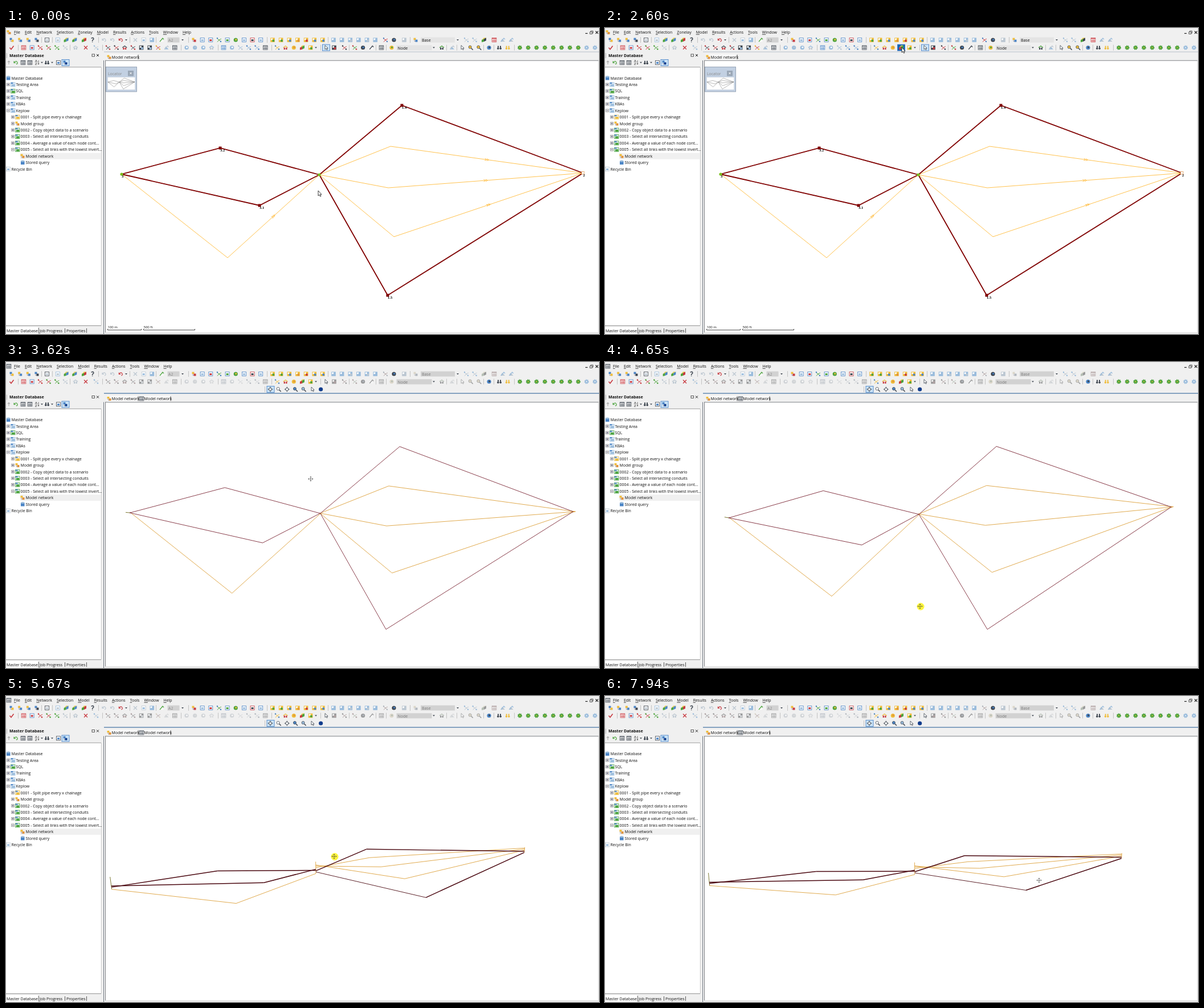
An HTML page that plays this animation: 1041x538 px, repeating every 8000 ms.

```html
<!DOCTYPE html>
<html lang="en">
<head>
<meta charset="utf-8">
<title>Network 3D view</title>
<style>
html, body { margin: 0; width: 100%; height: 100%; overflow: hidden; background: #f0f0f0; }
svg { display: block; width: 1041px; height: 538px; }
text { font: 6.95px "Open Sans", "Noto Sans", sans-serif; fill: #111; white-space: pre; }
.bold { font-size: 7.15px; font-weight: 700; }
.node { font: 700 6.5px "Liberation Serif", serif; fill: #000; }
.small { font-size: 6px; }
.grey { fill: #8a8a8a; }
.solid .off { filter: grayscale(.8) opacity(.5); }
.combo rect { fill: #e4e4e4; }
.solid .combo rect { fill: #d2d2d2; }
.solid .combo text { fill: #777; }
#view path { fill: none; }
</style>
</head>
<body>
<svg id="stage" viewBox="0 0 1041 538"></svg>
<script>
const stage = document.getElementById('stage');
const $ = id => document.getElementById(id);
const OPEN_TAB = 2700, OPEN_VIEW = 3220, SHIFT_AT = 3480, LOOP = 8000;
const SHIFT = 13.5, PITCH = 14.65, ROW = 11.43;

// ---------- drawing helpers ----------
const rect = (x, y, w, h, fill, stroke = 'none') =>
  `<rect x="${x}" y="${y}" width="${w}" height="${h}" fill="${fill}" stroke="${stroke}" stroke-width=".8"/>`;
const disc = (x, y, r, fill, stroke = 'none') =>
  `<circle cx="${x}" cy="${y}" r="${r}" fill="${fill}" stroke="${stroke}" stroke-width=".8"/>`;
const path = (d, stroke, w = 1, fill = 'none') =>
  `<path d="${d}" stroke="${stroke}" stroke-width="${w}" fill="${fill}"/>`;
const text = (x, y, s, cls = '') => `<text x="${x}" y="${y}" class="${cls}">${s}</text>`;
const group = (id, body) => `<g id="${id}">${body}</g>`;
const button = (x, y) => rect(x - 6.5, y - 5.5, 13, 11, '#cce4f7', '#3a78c2');

// ---------- toolbar icons ----------
const INK = {
  b: '#4a84c6', l: '#9abcdc', y: '#efbd3c', r: '#c83a40', g: '#4ba33c',
  k: '#3c444e', p: '#bcc7d1', w: '#ffffff', n: '#103c8c', o: '#e0923a'
};
const ICON = {
  t: (a, b) => rect(-3.5, -3.5, 4, 3.5, a) + rect(-.5, -.5, 4, 4, b) + path('M-2 0V2.5H0', '#889', .7),
  s: (a, b) => rect(-3.5, -3.5, 7, 7, '#fff', a) + rect(-2, -1, 4, 3, b),
  f: (a, b) => rect(-3.5, -3.5, 7.5, 7, '#e3edf6', a) + rect(-3.5, -3.5, 4, 2, b) + rect(-2, -.5, 5.5, 3.5, a),
  m: (a, b) => rect(-3.8, -3.8, 7.6, 7.6, a) + rect(-2.8, -2.8, 3, 3, '#fff') + rect(-.5, -.5, 3.6, 3.6, b),
  d: (a, b) => disc(0, 0, 3.6, a) + disc(.5, -.5, 1.6, b),
  b: (a, b) => rect(-3, -2.5, 6.5, 6, a) + `<ellipse cx=".2" cy="-2.5" rx="3.2" ry="1.5" fill="${b}"/>`,
  x: a => path('M-3-3L3 3M3-3L-3 3', a, 1.3),
  n: (a, b) => path('M-4-3L0 0L4-2M0 0L-3 3.5M0 0L3.5 3.5', a, .9) + disc(-3, -3, 1.2, b) + disc(3, 2.8, 1.2, b),
  g: a => rect(-3.8, -3.5, 7.6, 7, '#fff', a) + path('M-4-2.5H4M-3.5 1H3.5M-1-2V3.5M1.5-2V3.5', a, .8),
  c: a => path('M-3.5 0L-1 3L3.5-3', a, 1.6),
  u: a => path('M-3-2.5V.5H0M-3 .5Q1-5 3 0Q3.5 2 1 3', a, 1.1),
  i: (a, b) => path('M-4 0L0-3L4 0', a, 1.2) + rect(-3, 0, 2.4, 3.4, b) + rect(.5, 0, 2.4, 3.4, b),
  k: a => path('M-2-3V0M2-3V0', a, 2) + disc(-2.2, 1.5, 1.8, a) + disc(2.2, 1.5, 1.8, a),
  z: (a, b) => path('M1 1L4 4', a, 1.5) + disc(-1, -1, 2.5, b, a),
  h: (a, b) => `<circle r="3" fill="${a}" stroke="${a}" stroke-width="2" stroke-dasharray="1.5 1"/>` + disc(0, 0, 1, b),
  q: a => path('M-2-3Q3-5 2-1L0 .5V2M0 3V4', a, 1.5),
  e: (a, b) => path('M-4 3L-1-2L4 3Z', 'none', 0, b) + path('M-3 3L2-3L4-1', a, 1.2),
  a: (a, b) => path('M-2-4V3L0 1.5L1.2 4L2.3 3.4L1.2 1H3.2Z', a, .8, b),
  o: (a, b) => disc(0, 0, 2.7, b, a) + path('M0-4.5V-1.5M0 1.5V4.5M-4.5 0H-1.5M1.5 0H4.5', a, .9),
  j: (a, b) => path('M-4 0L0-2V3L-4 4Z', 'none', 0, a) + path('M0-2L4-4V1L0 3Z', 'none', 0, b) +
    path('M-4 0L0-4L4-4L0-2Z', 'none', 0, '#e9cf4e'),
  v: a => path('M-2-1H2L0 1.3Z', 'none', 0, a)
};

// A number starts a run of evenly spaced icons; "|" puts a separator before it, "*" greys it in the solid view
function icons(spec, y) {
  let x = 0, off = '', out = '';
  for (const token of spec.trim().split(/\s+/)) {
    const run = token.match(/^(\|?)(\*?)([\d.]+)$/);
    if (run) {
      x = +run[3];
      off = run[2] && 'off';
      if (run[1]) out += path(`M${x - 9.5} ${y - 5}v10`, '#b8b8b8', .8);
      continue;
    }
    const [kind, a, b] = token;
    out += `<g transform="translate(${x} ${y})" class="${off}">${ICON[kind](INK[a], INK[b])}</g>`;
    x += PITCH;
  }
  return out;
}
const ROW1 = `10 tby tyb tyb tbk |72 skp |91 slp jgb jgb 137 jgr qk |172 up up urg 211 vk
  |227 xp spl mll |273 egw 310 vk |330 tyr sbl sbr ngb sbg dgy sbl srk sbl
  |468 myg myg myb myo myr myb myb |575 mll mll mlp mll mlp mll *666 nrb 681 dkb 699 mpp
  |*719 tyb 793 vk 808 npl npl *839 jgk *857 gr 872 elp elp`;
const ROW2 = `10 cr |31 gr sbr 60 nrr nrg ngg npp |122 ipp 140 xr 158 npl
  |*179 nkr nrk ikr nkr mkl mkl nry epl gk |*317 dlw dlp dlw ilp |*382 gb dlw nlp nlb nlb gk
  |476 nyb iyr dyo jrg myg 544 vk |562 akw *576 mkr *594 nrk |*612 ngr dkb ekw |*659 gk
  |*677 dyg 751 vk *765 igk |*783 epl |*801 akw zky zky |848 dbk |866 kk ky
  |902 ${'hgy '.repeat(8)} hlw hlw`;
const ROW3 = '|464 okw zkw okw zkb zkl 538 akw dnn';

// ---------- menus ----------
const menu = names => '<text x="14" y="10.3">' + names.map((s, i) =>
  `<tspan dx="${i && 8}" text-decoration="underline">${s[0]}</tspan>${s.slice(1)}`).join('') + '</text>';
const first = ['File', 'Edit', 'Network', 'Selection'];
const rest = ['Model', 'Results', 'Actions', 'Tools', 'Window', 'Help'];
const windowBtns = path('M1017 9.5H1021', '#222', 1.2) + rect(1025, 7, 4, 3.5, 'none', '#333') +
  path('M1026.5 7V5.2H1030.5V9H1029', '#333', .8) + path('M1035 5.5L1039.5 10M1039.5 5.5L1035 10', '#222', 1.1);

// ---------- database tree: depth, toggle, icon, label ----------
const TREE = [
  [0, '', 'bbl', 'Master Database'], [0, '+', 'flb', 'Testing Area'], [0, '+', 'fgb', 'SQL'],
  [0, '+', 'flb', 'Training'], [0, '+', 'flb', 'KBAs'], [0, '-', 'flb', 'Keplow'],
  [1, '+', 'fyb', '0001 - Split pipe every x chainage'], [1, '+', 'tyo', 'Model group'],
  [1, '+', 'fgb', '0002 - Copy object data to a scenario'],
  [1, '+', 'fgb', '0003 - Select all intersecting conduits'],
  [1, '+', 'fgb', '0004 - Average a value of each node cont...'],
  [1, '-', 'fgb', '0005 - Select all links with the lowest invert...'],
  [2, '', 'tyo', 'Model network'], [2, '', 'bbl', 'Stored query'], [0, '', 'spl', 'Recycle Bin']
];
const tree = TREE.map(([depth, toggle, icon, label], i) => {
  const y = 88 + i * ROW, x = 4 + depth * 8;
  const ix = toggle ? x + 8 : depth ? 29 : 4;
  const box = toggle && rect(x - 2.3, y - 2.3, 4.6, 4.6, '#fff', '#888') +
    path(`M${x - 1.4} ${y}h2.8` + (toggle === '+' ? `M${x} ${y - 1.4}v2.8` : ''), '#224', .8);
  return (i === 12 ? rect(25, y - 5.5, 142, 11, '#f0f0f0') : '') + box +
    icons(`${ix} ${icon}`, y) + text(ix + 5.5, y + 2.6, label);
}).join('');

const panel = rect(0, 41, 168, 28, '#f0f0f0') + text(6, 50.8, 'Master Database', 'bold') +
  path('M1.5 44V53', '#bbb') + rect(151, 46, 4.5, 4, 'none', '#333') +
  path('M159 46L163 50M163 46L159 50', '#222') + path('M5 64V58M3 60L5 58L7 60', '#aaa', 1.1) +
  button(104.5, 61) + icons('17 ug 30 gk 42 gk 63 vk 72 kk 81 vk 92 skb 104 tbn', 60.8) +
  text(51, 60, 'A', 'small') + text(51, 65, 'Z', 'small') + path('M57 57V64M56 62.5L57 64L58 62.5', '#333', .7) +
  path('M0 68.8H167', '#8a8a8a', .8);

const tab = (x, icon) => rect(x, 45.5, 55, 11.5, '#f8f8f8') + icons(`${x + 4} ${icon}`, 51) +
  text(x + 8.5, 53.8, 'Model network') + path(`M${x + 55} 47V55`, '#333', .9);
const strip = rect(168, 41, 873, 16, '#f0f0f0') + path('M172 42H1041', '#a8b4c0', .8) +
  tab(177, 'tyo') + group('tab2', tab(234, 'gk')) + path('M174 57.2H1040', '#7d8084');
const combo = (x, y, w, s) => `<g class="combo">${rect(x, y - 4.5, w, 9, '')}${text(x + 2, y + 2.7, s)}</g>`;

// ---------- network ----------
const PLAN = {
  L: [203, 257], A: [376, 211], B: [445, 312], C: [389, 404], M: [550, 258], T: [695, 136],
  E: [675, 208], F: [671, 281], G: [681, 367], D: [670, 470], R: [1013, 255]
};
const DARK = ['LAM', 'LBM', 'MTR', 'MDR'], PALE = ['LCM', 'MER', 'MFR', 'MGR'];
const LABELS = { L: '3', A: '3.2', B: '3.1', T: '1.4', D: '1.5', R: '2' };
const routes = list => list.map(s => 'M' + [...s].map(k => PLAN[k].join(' ')).join('L')).join('');
const chevrons = ['CM', 'ER', 'FR', 'GR'].map(([p, q]) => {
  const [[ax, ay], [bx, by]] = [PLAN[p], PLAN[q]];
  const turn = Math.atan2(by - ay, bx - ax) * 180 / Math.PI;
  return `<g transform="translate(${(ax + bx) / 2} ${(ay + by) / 2}) rotate(${turn})">` +
    path('M-3.5-2L0 0L-3.5 2M0-2L3.5 0L0 2', '#ffbf4a', .9) + '</g>';
}).join('');
const nodes = [...'ABTD'].map(k => rect(PLAN[k][0] - 2.5, PLAN[k][1] - 2.5, 5, 5, '#800000')).join('') +
  [...'LM'].map(k => disc(...PLAN[k], 2.6, '#7ac01e')).join('') + rect(1010.5, 252.5, 4.5, 4.5, '#fff', '#e0a060') +
  Object.entries(LABELS).map(([k, s]) => text(PLAN[k][0], PLAN[k][1] + 6.3, s, 'node')).join('');
const locator = rect(175.5, 68.5, 54, 43.5, '#c2d0e2', '#8796aa') + text(179, 82.5, 'Locator', 'grey') +
  rect(214, 75, 10, 9.5, '#9aa7b6') + path('M217.5 78L220.5 81.2M220.5 78L217.5 81.2', '#fff') +
  rect(178.5, 86.5, 48, 22, '#fff', '#d4dbe4') +
  `<g transform="translate(167.1 80.1) scale(.058)">${path(routes([...DARK, ...PALE]), '#777', 9)}</g>`;
const map = path(routes(PALE), '#ffc24f') + chevrons + path(routes(DARK), '#800000', 1.8) + nodes + locator +
  text(178.5, 528, '100 m', 'small') + text(241.5, 528, '500 ft', 'small') +
  path('M178.5 529V531H237.5V529M241.5 529V531H331.5V529', '#333', .9);

// ---------- cursors ----------
const cursors =
  group('arrow', path('M0 0V9L2 7.2L3.5 10.2L5 9.5L3.6 6.6H6Z', '#111', .8, '#fff')) +
  group('upArrow', path('M0 .5L7 7.5H3.8V12.5H-3.8V7.5H-7Z', '#111', 1.2, '#fff')) +
  group('orbit', group('halo', disc(1, .5, 6.5, '#fdf53e')) +
    path('M0-4.2L-1.6-2.5H1.6ZM0 4.2L-1.6 2.5H1.6ZM-4.4 0L-2.6-1.6V1.6ZM4.4 0L2.6-1.6V1.6Z', 'none', 0, '#333') +
    disc(0, 0, 1.1, '#333'));

stage.innerHTML =
  rect(0, 0, 1041, 538, '#f0f0f0') + rect(0, 60, 167, 463, '#fff') + rect(174.5, 57, 865.5, 478.5, '#fff') +
  path('M174.5 57V535.5', '#7d8084') + path('M171.5 55V538', '#6f7780') + path('M167.3 55V523', '#bbb', .7) +
  path('M1040 57V535.5H174.5', '#d8d8d8', .8) + path('M0 523.3H167', '#777', .8) +
  rect(0, 526, 57, 12, '#fff') + text(1, 534.8, 'Master Database') + text(59, 534.8, 'Job Progress') +
  text(106, 534.8, 'Properties') + path('M57.3 527V537M103.5 528V536M141.5 528V536', '#333', .8) +
  group('map', map) + group('view', '') + group('low', tree + panel + strip) +
  group('row3', rect(168, 41, 873, 13.5, '#f0f0f0') + path('M172 55H1041', '#3a6ea5') +
    button(464.5, 48) + icons(ROW3, 48)) +
  group('bars', rect(283.5, 16.5, 21, 9, '#d2d2d2') + text(285, 23.8, 'A2', 'grey') +
    combo(728, 21, 60, 'Base') + combo(685.5, 34.8, 62, 'Node') +
    group('hot', button(520, 34.5)) + group('pick', button(562, 34.5)) +
    icons(ROW1, 21) + icons(ROW2, 34.5)) +
  group('menuA', icons('5 tyo', 7.5) + menu([...first, 'Zonelay', ...rest])) +
  group('menuB', icons('5 gk', 7.5) + menu([...first, ...rest])) + windowBtns + cursors;

// ---------- motion: [time, values...] ----------
const CAMERA = [[4040, 0, 0], [4650, .022, .04], [4760, .022, .04], [4980, .18, .85],
  [5300, .19, .9], [5670, .325, 1.3], [5800, .335, 1.38]];
const MOUSE = [[850, 548, 286], [920, 548, 280], [1190, 548, 280], [1330, 556, 294], [1730, 516, 62],
  [1930, 522, 42], [2270, 521, 34], [3220, 521, 34], [4100, 553, 429.5], [4760, 553, 429.5], [4980, 590.5, 188.5],
  [5300, 570, 380], [5670, 576, 282], [5800, 577, 274], [6200, 577, 274], [6960, 390, 376],
  [7300, 480, 425], [7810, 729, 329], [7940, 762, 324]];

function at(keys, t) {
  const i = keys.findIndex(k => k[0] >= t);
  if (i < 1) return keys[i ? keys.length - 1 : 0].slice(1);
  const [a, b] = [keys[i - 1], keys[i]];
  const f = (t - a[0]) / (b[0] - a[0]), ease = f * f * (3 - 2 * f);
  return a.slice(1).map((v, j) => v + (b[j + 1] - v) * ease);
}

// ---------- solid view ----------
const EYE = 880, SINK = 6.5;
// Height of each shaft's top and depth of its foot
const SHAFTS = { L: [17, 3.5], M: [14, 8], R: [6.5, 4.5] };
// Depth of each link at its two ends
const DEPTH = { LCM: [3.5, 8], MER: [-3, -5], MFR: [-6, -3], MGR: [-8, -.5],
  LAM: [0, 2], LBM: [-2, 0], MTR: [3, 2], MDR: [5, 4.5] };

function projector(yaw, tilt, shifted) {
  const zoom = shifted ? .972 : 1, midY = shifted ? 303 : 296;
  const [c, s, ct, st] = [Math.cos(yaw), Math.sin(yaw), Math.cos(tilt), Math.sin(tilt)];
  return (key, depth = 0) => {
    const u = (550 + (PLAN[key][0] - 550) * .99 - 607) * zoom;
    const v = (258 + (PLAN[key][1] - 258) * .99 - 296) * zoom;
    const x = u * c + v * s, y = v * c - u * s;
    const k = EYE / (EYE - y * st + depth * ct);
    return `${(607 + x * k).toFixed(2)} ${(midY + (y * ct + (depth + SINK) * st) * k).toFixed(2)}`;
  };
}

function drawView(yaw, tilt, shifted) {
  const pt = projector(yaw, tilt, shifted), side = Math.sin(tilt);
  const dark = tilt > .4 ? '#4a0810' : '#7d2a38', orange = '#dda13c';
  let out = '';
  for (const k in SHAFTS) {
    const [top, foot] = SHAFTS[k];
    out += path(`M${pt(k, -top)}L${pt(k, foot)}`, k === 'L' ? '#6f6a1c' : orange, .9);
  }
  for (const link in DEPTH) {
    const [a, b, c] = link, [u, v] = DEPTH[link];
    const color = DARK.includes(link) ? dark : orange;
    const w = DARK.includes(link) ? .9 + .6 * side : .9;
    out += path(`M${pt(a, u)}L${pt(b)}`, color, b === 'D' ? .9 : w) + path(`M${pt(b)}L${pt(c, v)}`, color, w);
  }
  $('view').innerHTML = out;
}

const show = (id, on) => { $(id).style.display = on ? '' : 'none'; };

function render(t) {
  const tabbed = t >= OPEN_TAB, open = t >= OPEN_VIEW, shifted = t >= SHIFT_AT;
  show('menuA', !tabbed);
  show('menuB', tabbed);
  show('tab2', tabbed);
  show('map', !open);
  show('view', open);
  show('row3', shifted);
  show('pick', !shifted);
  show('hot', t >= 2140 && !shifted);
  $('hot').firstChild.setAttribute('fill', t < 2410 ? '#cce4f7' : '#0f62b4');
  $('low').setAttribute('transform', `translate(0 ${shifted ? SHIFT : 0})`);
  $('bars').setAttribute('class', shifted ? 'solid' : '');
  if (open) drawView(...at(CAMERA, t), shifted);

  const kind = shifted ? 'orbit' : t >= 1600 && t < 1900 ? 'upArrow' : 'arrow';
  for (const id of ['arrow', 'upArrow', 'orbit']) show(id, id === kind);
  $(kind).setAttribute('transform', `translate(${at(MOUSE, t).join(' ')})`);
  show('halo', (t >= 4300 && t < 5060) || (t >= 5300 && t < 6200));
}

const start = performance.now();
function tick() {
  render((performance.now() - start) % LOOP);
  requestAnimationFrame(tick);
}
tick();
</script>
</body>
</html>
```
